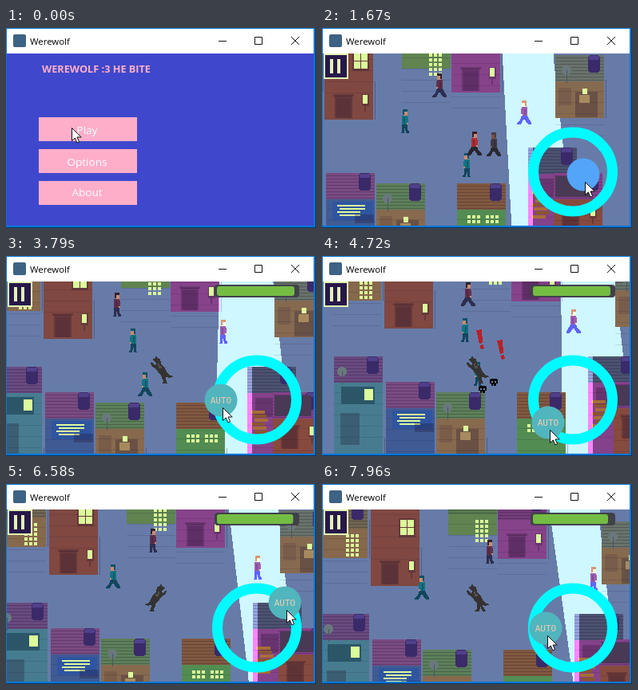
Animation of 388x251 px, one loop 8 s. Source, as an HTML page:

```html
<!DOCTYPE html>
<html lang="en">
<head>
<meta charset="utf-8">
<title>Werewolf</title>
<style>
html, body { margin: 0; width: 100%; height: 100%; overflow: hidden; background: #0b3561; }
svg { display: block; }
text { font-family: "Open Sans", "Noto Sans", sans-serif; }
.px { shape-rendering: crispEdges; }
#beam { mix-blend-mode: color-dodge; }
</style>
</head>
<body>
<svg width="388" height="251" viewBox="0 0 388 251">
  <rect width="388" height="251" fill="#0b3561"/>
  <rect width="387" height="250" fill="#0878d7"/>
  <rect x="1" y="1" width="384" height="31" fill="#fff"/>
  <rect x="9" y="8" width="16" height="16" rx="2" fill="#3d6284"/>
  <text x="30" y="21" font-size="11.4">Werewolf</text>
  <path d="M266 16.5h10M311.5 11.5h9v9h-9zM357 11l10 10M367 11l-10 10" fill="none" stroke="#111"/>

  <svg x="1" y="32" width="384" height="216" viewBox="1 32 384 216">
    <g id="game">
      <g id="world" class="px">
        <rect x="-200" y="-100" width="900" height="600" fill="#677ba8"/>
        <g id="back"></g>
        <g id="people"></g>
        <path id="beam" fill="#808080"/>
        <g id="front"></g>
        <g id="signs">
          <g fill="#b52227">
            <path id="alert" d="M118 117l7-1 1 17-4 1zM122 136l5-1 1 5-4 1z"/>
            <use href="#alert" x="26" y="13"/>
          </g>
          <g id="skulls">
            <g id="skull">
              <path d="M122 187h8v1h1v5h-2v3h-6v-3h-2v-5h1z" fill="#0b0b0e"/>
              <path d="M123 190h2v2h-2zM127 190h2v2h-2zM125 194h1v2h-1z" fill="#77839a"/>
            </g>
            <use href="#skull" x="14" y="-9"/>
          </g>
        </g>
      </g>
      <g id="human" class="px"></g>
      <g id="wolf" class="px" fill="#353332">
        <path d="M-3-19l1 4 4 1 1 6 5 6 3 6 3 3 5 1-6 2-5-2-4 0-5-6-3-4-4-2-2-4 1-2 4 4 2-2-3-3-2-2 4-2z"/>
        <path id="paws"/>
        <path fill="#55504b" d="M-1-8h2v3h3v3h-4z"/>
      </g>
      <g class="px">
        <rect x="2" y="32" width="31" height="32" fill="#e2f4b4"/>
        <rect x="4" y="34" width="27" height="28" fill="#27184a"/>
        <path d="M10 39h4v18h-4zM19 39h4v18h-4z" fill="#e2f4b4"/>
      </g>
      <g id="health">
        <rect x="261" y="36" width="106" height="16" rx="4" fill="#41414b"/>
        <rect id="life" x="264" y="38" height="12" rx="3" fill="#74bd43"/>
      </g>
      <circle cx="314" cy="180.5" r="49.5" fill="none" stroke="#00fbff" stroke-width="13"/>
      <g id="nub">
        <circle id="knob" r="20.5"/>
        <text id="auto" y="4" font-size="11" text-anchor="middle" fill="#f2cbb0" style="font-family:'DejaVu Sans Mono',monospace">AUTO</text>
      </g>
    </g>
    <g id="menu">
      <rect y="32" width="388" height="219" fill="#3f48cc"/>
      <text x="45" y="56" font-size="12.7" font-weight="700" fill="#ffaec9">WEREWOLF :3 HE BITE</text>
      <path d="M41 112h123v30H41zM41 152h123v30H41zM41 192h123v30H41z" fill="#ffaec9"/>
      <g font-size="13.5" fill="#fff" text-anchor="middle">
        <text x="101.5" y="133">Play</text>
        <text x="101.5" y="173">Options</text>
        <text x="101.5" y="211">About</text>
      </g>
    </g>
    <path id="cursor" d="M.5.5v16l3.8-3.5 2.6 6 2.7-1.2-2.6-5.8h5.2z" fill="#fff" stroke="#111"/>
  </svg>
</svg>
<script>
const LOOP = 8000, START = 150, CHANGE = 2550;
const WIDE = 61, ROOF = 33;
const LIT = '#dcfb9b', SHADE = 'rgba(30,15,40,.28)', FAINT = 'rgba(30,15,40,.13)';

const $ = id => document.getElementById(id);
const rect = (x, y, w, h, c, r = 0) => `<rect x="${x}" y="${y}" width="${w}" height="${h}" fill="${c}" rx="${r}"/>`;
const repeat = (n, f) => Array.from({ length: n }, (_, i) => f(i)).join('');

// Houses: shared roof, wall and chimney, plus a facade
const grid = (x, y, cols, rows) =>
  repeat(cols * rows, i => rect(x + i % cols * 6, y + (i / cols | 0) * 6, 4, 4, LIT));
const dish = (x, y) => `<circle cx="${x}" cy="${y}" r="6" fill="#69787c"/>` + rect(x, y, 1, 16, '#4b5560');
const lamp = (x, y) => rect(x - 1, y - 1, 9, 15, SHADE) + rect(x, y, 6, 11, LIT) + rect(x + 2, y + 14, 2, 7, SHADE);
const doorway = (x, y) => rect(x - 2, y - 2, 26, 3, SHADE) + rect(x, y, 22, 28, SHADE) + rect(x + 2, y + 3, 18, 25, FAINT);

// x, y: left end and lower end of the roof; b: foot of the wall
const facades = {
  door: (x, y, b) => doorway(x + 13, b - 30) + lamp(x + 48, b - 31),
  tall: (x, y, b) => facades.door(x, y, b) + rect(x + 35, b - 85, 21, 24, SHADE) +
    repeat(4, i => rect(x + 37 + i % 2 * 9, b - 83 + (i >> 1) * 10, 8, 9, LIT)),
  grid: (x, y) => grid(x + 34, y + 7, 3, 5),
  twin: (x, y) => grid(x + 13, y + 7, 3, 2) + grid(x + 36, y + 7, 3, 2),
  bars: (x, y) => rect(x + 8, y + 3, 50, 23, '#2f55a0') +
    repeat(4, i => rect(x + 14 + i % 2 * 3, y + 7 + i * 4, 35 - i * 3, 2, LIT)) + rect(x + 36, y + 19, 24, 11, SHADE),
  den: (x, y) => dish(x + 14, y - 14) + rect(x + 25, y + 13, 28, 32, SHADE) +
    rect(x + 30, y + 17, 13, 10, '#a68a5e') + rect(x + 34, y + 9, 6, 7, LIT) + rect(x + 4, y + 8, 16, 22, FAINT),
  lab: (x, y) => dish(x + 10, y - 14) + rect(x + 9, y + 5, 42, 22, '#2b5668') + rect(x + 38, y + 8, 11, 14, LIT) +
    rect(x + 8, y + 38, 24, 40, SHADE),
  logs: (x, y) => rect(x + 10, y + 6, 24, 24, SHADE) + repeat(7, i => rect(x + 5 + i % 3 * 2, y + 22 + i * 5, 17, 4, i % 2 ? '#8b552f' : '#a86d35')),
  shade: (x, y) => rect(x + 2, y - 29, 46, 26, '#493955') + doorway(x + 10, y + 10) + lamp(x + 46, y + 10)
};

function house(kind, x, top, b, wall, roof) {
  const y = top + ROOF;
  return rect(x, top, WIDE, b - top, wall) + repeat(5, i => rect(x, y + 12 + i * 14, WIDE, 1, FAINT)) +
    rect(x, top, WIDE, ROOF, roof) + repeat(8, i => rect(x, top + 3 + i * 4, WIDE, 1, SHADE)) +
    rect(x + 41, top, 15, 22, '#3a2a69', 4) + rect(x + 42, top + 1, 13, 5, '#50408b', 2) +
    facades[kind](x, y, b) + rect(x + WIDE + 2, b - 48, 1, 48, SHADE);
}

const GROUND = 300;
$('back').innerHTML =
  house('grid', -62, 10, 80, '#86684c', '#6f6650') +
  house('tall', 3, -20, 115, '#804841', '#76403f') +
  house('grid', 100, -8, 51, '#5f8450', '#557a4b') +
  house('door', 162, -1, 81, '#86438a', '#743b7b') +
  house('lab', -60, 150, GROUND, '#477c90', '#694a80') +
  house('bars', 5, 182, GROUND, '#405b94', '#7a4b82') +
  house('den', 68, 195, GROUND, '#876a4e', '#5c8059') +
  house('logs', 258, 150, GROUND, '#84428a', '#4b5270');
$('front').innerHTML =
  house('twin', 169, 195, GROUND, '#528c52', '#81583f') +
  house('den', 292, 34, 113, '#866a50', '#68736a') +
  house('shade', 290, 182, GROUND, '#874a3e', '#84428a');

// Figures face left; their feet are at y = 15
function figure(hat, coat, legs, skin = '#c78d72') {
  return rect(-3, -15, 6, 3, hat) + rect(-3, -12, 5, 5, skin) + rect(1, -12, 2, 4, hat) +
    rect(-3, -7, 7, 12, coat) + rect(-4, -5, 2, 7, coat) + rect(0, -5, 2, 8, SHADE) + rect(-4, 2, 2, 2, skin) +
    `<path class="legs" fill="${legs}"/>`;
}
const STRIDE = 'M-3 4h7l5 9v2h-4l-5-7-3 5-1 2h-5v-2l4-4z', STAND = 'M-3 4h7v9l1 2h-4v-7l-2 5v2h-4v-2l2-2z';

// Each walker passes x at the time of its turn; pace is in pixels per second before and after
const cop = ['#0b5266', '#107583', '#12465c'];
const walkers = [
  { art: ['#33212c', '#60304d', '#2e2e50'], turn: 3390, x: 90, y: 72, pace: [-33, 13.5], end: LOOP },
  { art: cop, turn: 2930, x: 125, y: 117, pace: [17, -11.5], end: LOOP },
  { art: cop, turn: 2940, x: 139, y: 172, pace: [-33, -10.7], end: 4900 },
  { art: ['#4b3a45', '#3d3a42', '#2b2a33', '#7a5545'], turn: CHANGE, x: 204, y: 146, pace: [-13, 0], end: CHANGE },
  { art: ['#6b4a3a', '#4f2f58', '#2f3280'], turn: 3090, x: 219, y: 106, pace: [-24, 13], end: LOOP }
];
for (const w of walkers) {
  w.node = document.createElementNS('http://www.w3.org/2000/svg', 'g');
  w.node.innerHTML = figure(...w.art);
  $('people').append(w.node);
}
$('human').innerHTML = figure('#3a1d20', '#b0302f', '#28262f');

// Joystick: time, angle in degrees, reach
const steer = [
  [0, 0, 0], [870, 16, 14], [1690, 0, 0], [CHANGE, 180, 45], [2900, 150, 58], [3300, 180, 45], [4250, 137, 42],
  [5225, -42, 47], [6840, 45, 44], [7110, 135, 44], [7220, -135, 44], [7830, 0, 0], [7915, 180, 34]
];
const polar = (deg, r) => [r * Math.cos(deg * Math.PI / 180), r * Math.sin(deg * Math.PI / 180)];
const clamp = v => Math.min(1, Math.max(0, v));
const mix = (a, b, p) => a + (b - a) * p;

function stick(t) {
  const i = steer.findLastIndex(s => s[0] <= t);
  const [time, angle, reach] = steer[i], last = steer[Math.max(0, i - 1)];
  const a = polar(last[1], last[2]), b = polar(angle, reach), p = clamp((t - time) / 40);
  return [314 + mix(a[0], b[0], p), 180.5 + mix(a[1], b[1], p)];
}

// The player moves in eight directions; the world slides the other way
function camera(t) {
  let x = 8, y = 0;
  steer.forEach(([time, angle, reach], i) => {
    const end = Math.min(t, i + 1 < steer.length ? steer[i + 1][0] : LOOP);
    if (!reach || end <= time) return;
    const [dx, dy] = polar(Math.round(angle / 45) * 45, time < CHANGE ? 10 : 39);
    x -= dx * (end - time) / 1000;
    y -= dy * (end - time) / 1000;
  });
  return [x, y];
}

// The pointer leaves the Play button for the joystick, and once flings far left
function pointer(t, [x, y]) {
  const p = clamp((t - START) / 600), ease = p * p * (3 - 2 * p);
  const fling = 120 * Math.exp(-(((t - 7320) / 150) ** 2));
  return [mix(82, x + 2 - fling, ease), mix(125, y + 9, ease)];
}

const show = (el, on) => el.setAttribute('display', on ? 'inline' : 'none');
const place = (el, [x, y], flip) =>
  el.setAttribute('transform', `translate(${Math.round(x)} ${Math.round(y)})` + (flip ? ' scale(-1 1)' : ''));
const walk = (el, t) => el.querySelector('.legs').setAttribute('d', Math.floor(t / 170) % 2 ? STRIDE : STAND);

function draw(t) {
  const wild = t >= CHANGE, playing = t >= START, nub = stick(t);
  show($('menu'), !playing);
  show($('game'), playing);
  place($('cursor'), pointer(t, nub));

  const [wx, wy] = camera(t), heading = camera(t + 20)[0] - wx;
  place($('world'), [wx, wy]);
  const foot = 238 + 20 * Math.cos((t - 7600) / LOOP * 2 * Math.PI);
  $('beam').setAttribute('d', `M224 0H290V40L302 150H264V${GROUND}H${foot + 5}L${foot} 240z`);

  walkers.forEach((w, i) => {
    const pace = w.pace[t < w.turn ? 0 : 1];
    show(w.node, t < w.end);
    place(w.node, [w.x + pace * (t - w.turn) / 1000, w.y], pace > 0);
    walk(w.node, t + i * 90);
  });

  show($('human'), !wild);
  place($('human'), [191, 145], true);
  walk($('human'), t);

  show($('wolf'), wild);
  place($('wolf'), [191, 143], heading < 0);
  $('paws').setAttribute('d', Math.floor(t / 140) % 2
    ? 'M3 5l7 1-1 5 2 6h-6l1-3-2-4z'
    : 'M3 5l7 1-3 5-1 6h-6l3-4zM8 7l4 6 2 4h-4l-3-7z');

  show($('signs'), t > 4300 && t < 5200);
  show($('skulls'), t > 4550 && t < 5050);
  show($('health'), wild);
  $('life').setAttribute('width', 97 - Math.max(0, t - 5000) / 1000);
  show($('auto'), wild);
  $('knob').setAttribute('fill', wild ? '#51b5bd' : '#53a5fa');
  place($('nub'), nub);
}

function tick(now) {
  draw(now % LOOP);
  requestAnimationFrame(tick);
}
draw(0);
requestAnimationFrame(tick);
</script>
</body>
</html>
```
